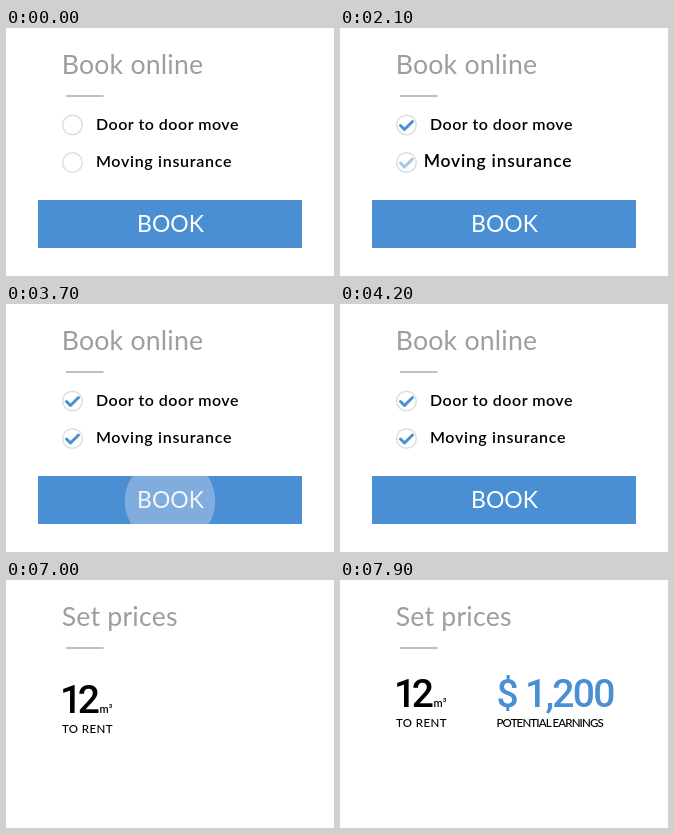
Write an HTML page that moves like this. It is 328x248 px and loops after 8000 ms.

```html
<!DOCTYPE html>
<html lang="en">
<head>
<meta charset="utf-8">
<title>Book online</title>
<style>
html, body { margin: 0; width: 100%; height: 100%; overflow: hidden; background: #fff; }
svg { display: block; font-family: Lato, "Open Sans", sans-serif; }
.title { font-size: 26.7px; fill: #9e9e9e; letter-spacing: .2px; }
.label { font-size: 16px; font-weight: 600; text-anchor: middle; letter-spacing: .5px; }
.ring { fill: #fff; stroke: #dcdfe2; stroke-width: 1.5; }
.check { fill: none; stroke: #4a8fd3; stroke-width: 3; stroke-linecap: round; stroke-linejoin: round; }
.book { font-size: 23px; fill: #fff; text-anchor: middle; }
.big { font: 500 39px Roboto, sans-serif; }
.unit { font-size: 11px; font-weight: 600; }
.small { font-size: 11.5px; font-weight: 500; }
</style>
</head>
<body>
<svg width="328" height="248" viewBox="0 0 328 248">
  <clipPath id="clip"><rect x="32" y="172" width="264" height="48"/></clipPath>
  <text id="title" class="title" x="55.7" y="45.5"></text>
  <path d="M60 68H97.5" stroke="#aaa" stroke-width="1.4"/>

  <g id="booking">
    <circle class="ring" cx="66.5" cy="97" r="9.8"/>
    <path id="check1" class="check" d="M60.5 97.5l4 4 8-8"/>
    <text id="label1" class="label" y="5.3">Door to door move</text>
    <circle class="ring" cx="66.5" cy="134.5" r="9.8"/>
    <path id="check2" class="check" d="M60.5 135l4 4 8-8"/>
    <text id="label2" class="label" y="5.3" style="letter-spacing:.7px">Moving insurance</text>
    <g clip-path="url(#clip)">
      <rect x="32" y="172" width="264" height="48" fill="#4a8fd3"/>
      <text class="book" x="164.5" y="203.5">BOOK</text>
      <circle id="ripple" cx="164" cy="197" fill="#dfe3f0"/>
    </g>
  </g>

  <g id="prices">
    <g id="rent">
      <text class="big" x="54" y="127" style="letter-spacing:-4.5px">12</text>
      <text class="unit" x="93.5" y="127">m³</text>
      <text class="small" x="56" y="147" style="letter-spacing:.4px">TO RENT</text>
    </g>
    <g id="earnings">
      <text class="big" x="156.5" y="127" fill="#4a8fd3" style="letter-spacing:-1.7px">$ 1,200</text>
      <text class="small" x="156.5" y="147" style="letter-spacing:-.85px">POTENTIAL EARNINGS</text>
    </g>
  </g>
</svg>
<script>
const el = id => document.getElementById(id);
const clamp = v => Math.max(0, Math.min(1, v));
const LOOP = 8000, STEP = 100;

// The label swells and settles while its check mark fades in.
function tick(n, t, start, from, x, y) {
  const k = t < from ? 0 : clamp((t - start) / 400);
  el('check' + n).setAttribute('opacity', k);
  el('label' + n).setAttribute('transform',
    `translate(${x} ${y}) scale(${1 + .09 * Math.sin(Math.PI * k)})`);
}

function ripple(t) {
  const k = (t - 3500) / 700, on = k >= 0 && k < 1;
  el('ripple').setAttribute('r', on ? 8 + 130 * k : 0);
  el('ripple').setAttribute('opacity', on ? .5 * (1 - k) : 0);
}

// Fades in while rising to its resting place.
function rise(id, t, start, duration) {
  const k = clamp((t - start) / duration);
  el(id).setAttribute('opacity', t < start ? 0 : clamp(.15 + k));
  el(id).setAttribute('transform', `translate(0 ${19 * (1 - k ** 2.4)})`);
}

function draw() {
  const t = Math.floor(performance.now() % LOOP / STEP) * STEP;
  const booking = t < 6000;
  el('title').textContent = booking ? 'Book online' : 'Set prices';
  el('booking').style.display = booking ? '' : 'none';
  el('prices').style.display = booking ? 'none' : '';
  tick(1, t, 400, 500, 161.5, 97);
  tick(2, t, 1900, 2100, 158, 133.5);
  ripple(t);
  rise('rent', t, 6400, 700);
  rise('earnings', t, 7300, 600);
  requestAnimationFrame(draw);
}
draw();
</script>
</body>
</html>
```
